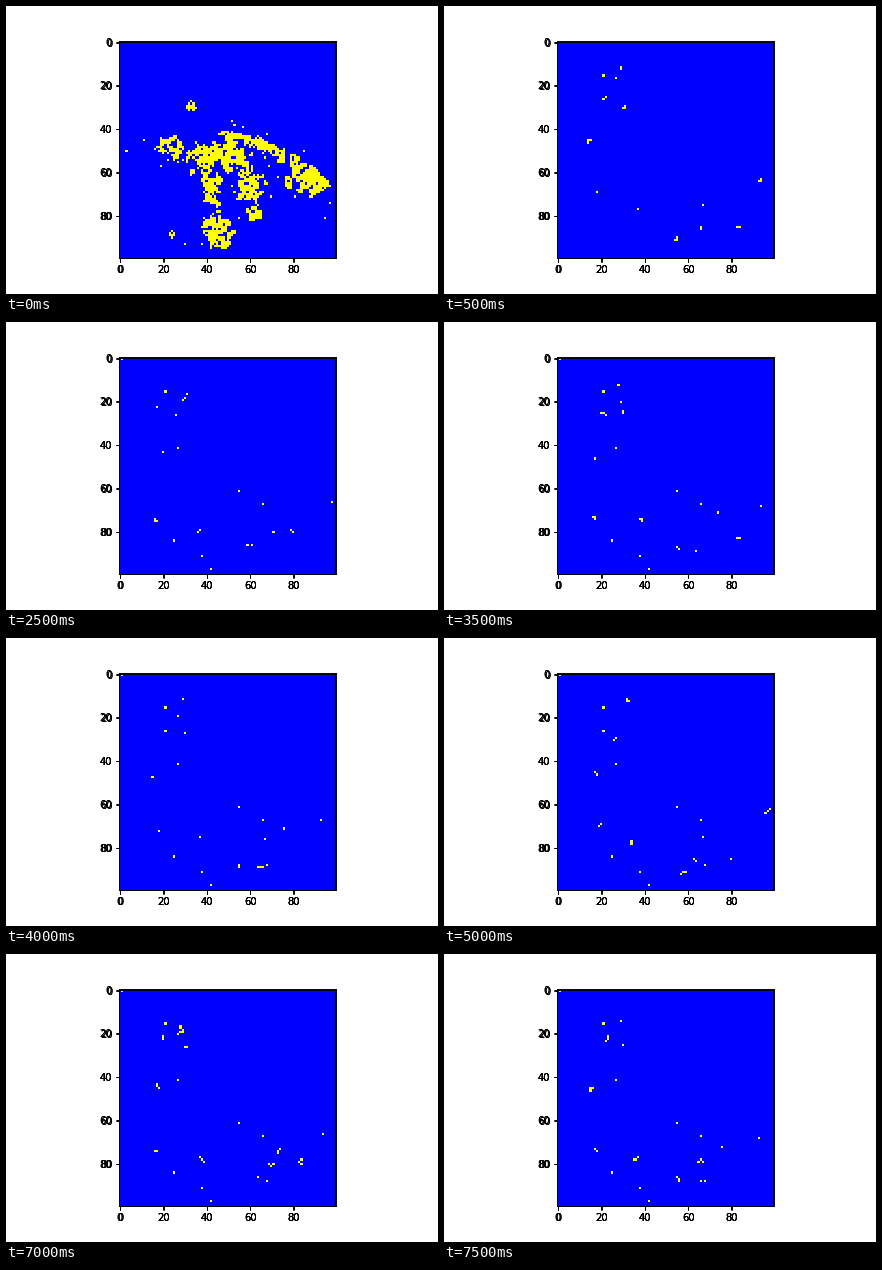
A matplotlib script that plays this animation: 432x288 px, repeating every 8 s.

```python
import numpy as np
import matplotlib.pyplot as plt
from matplotlib.animation import FuncAnimation
from matplotlib.colors import ListedColormap

WIDTH, HEIGHT, DPI = 432, 288, 72
SIZE, STEPS, STEP_MS = 100, 16, 500

# Places the wandering cells circle around
HOMES = [(20, 25), (28, 18), (31, 14), (28, 28), (18, 45), (18, 72), (37, 78),
         (58, 89), (64, 87), (69, 78), (77, 74), (82, 83), (96, 66)]

# Cells that stay once they arrive, in order of arrival
SETTLED = [(21, 15), (27, 41), (55, 61), (66, 67), (25, 84), (38, 91),
           (42, 97), (1, 0), (68, 88)]

# Lobes of the opening colony: x, y, half width, half height
LOBES = [(44, 53, 17, 8), (24, 49, 6, 5), (43, 67, 5, 8), (60, 66, 7, 9),
         (88, 65, 9, 7), (46, 86, 7, 9), (62, 79, 5, 3), (33, 29, 2, 2),
         (24, 89, 2, 2)]


def rough_noise(rng):
    """Noise with small clumps, scaled to unit spread."""
    noise = rng.normal(size=(SIZE, SIZE))
    for axis in (0, 1):
        noise = noise + 0.8 * (np.roll(noise, 1, axis) + np.roll(noise, -1, axis))
    return noise / noise.std()


def colony():
    rng = np.random.default_rng(4)
    y, x = np.mgrid[:SIZE, :SIZE]
    ridge = [(50 + 40 * t, 43 + 6 * t + 13 * t * t, 4, 3)
             for t in np.linspace(0, 1, 14)]
    dist = np.min([((x - cx) / rx) ** 2 + ((y - cy) / ry) ** 2
                   for cx, cy, rx, ry in LOBES + ridge], axis=0)
    grid = dist + 0.5 * rough_noise(rng) < 0.8
    grid &= rng.random(grid.shape) > 0.12
    # Loose cells at the fringe
    grid |= (dist < 6) & (rng.random(grid.shape) < 0.006)
    return grid.astype(float)


def settled_count(step):
    return 1 if step < 2 else 7 if step < 3 else 8 if step < 8 else 9


def state(step):
    if step == 0:
        return colony()
    grid = np.zeros((SIZE, SIZE))
    rng = np.random.default_rng(step)
    for i, (hx, hy) in enumerate(HOMES):
        x = hx + 2.5 * np.sin(0.9 * step + 2.4 * i)
        y = hy + 2.5 * np.cos(0.7 * step + 1.7 * i)
        if rng.random() < 0.15:
            continue
        for _ in range(rng.integers(1, 4)):
            grid[int(np.clip(y, 0, 99)), int(np.clip(x, 0, 98))] = 1
            x += rng.integers(-1, 2)
            y += rng.integers(-1, 2)
    for x, y in SETTLED[:settled_count(step)]:
        grid[y, x] = 1
    return grid


def square_axes(side, label):
    """Square axes sharing a centre line and a bottom edge."""
    left = 0.5125 * WIDTH - side / 2
    ax = fig.add_axes([left / WIDTH, 0.125, side / WIDTH, side / HEIGHT],
                      label=label)
    ax.set(xlim=(-0.5, SIZE - 0.5), ylim=(SIZE - 0.5, -0.5),
           xticks=range(0, SIZE, 20), yticks=range(0, SIZE, 20))
    ax.patch.set_visible(False)
    return ax


plt.rcParams.update({"font.family": "DejaVu Sans", "font.size": 10})
fig = plt.figure(figsize=(WIDTH / DPI, HEIGHT / DPI), dpi=DPI,
                 facecolor="white")

# Two nearly equal frames, each laid twice, give the heavy doubled labels
layers = [square_axes(side, f"{side}-{n}")
          for side in (217.44, 216) for n in range(2)]
image = layers[0].figure.axes[2].imshow(
    state(0), cmap=ListedColormap(["blue", "yellow"]), vmin=0, vmax=1,
    interpolation="nearest", aspect="auto")


def update(step):
    image.set_data(state(step))
    return [image]


anim = FuncAnimation(fig, update, frames=STEPS, interval=STEP_MS,
                     repeat=True, repeat_delay=0, blit=False)
plt.show()
```
